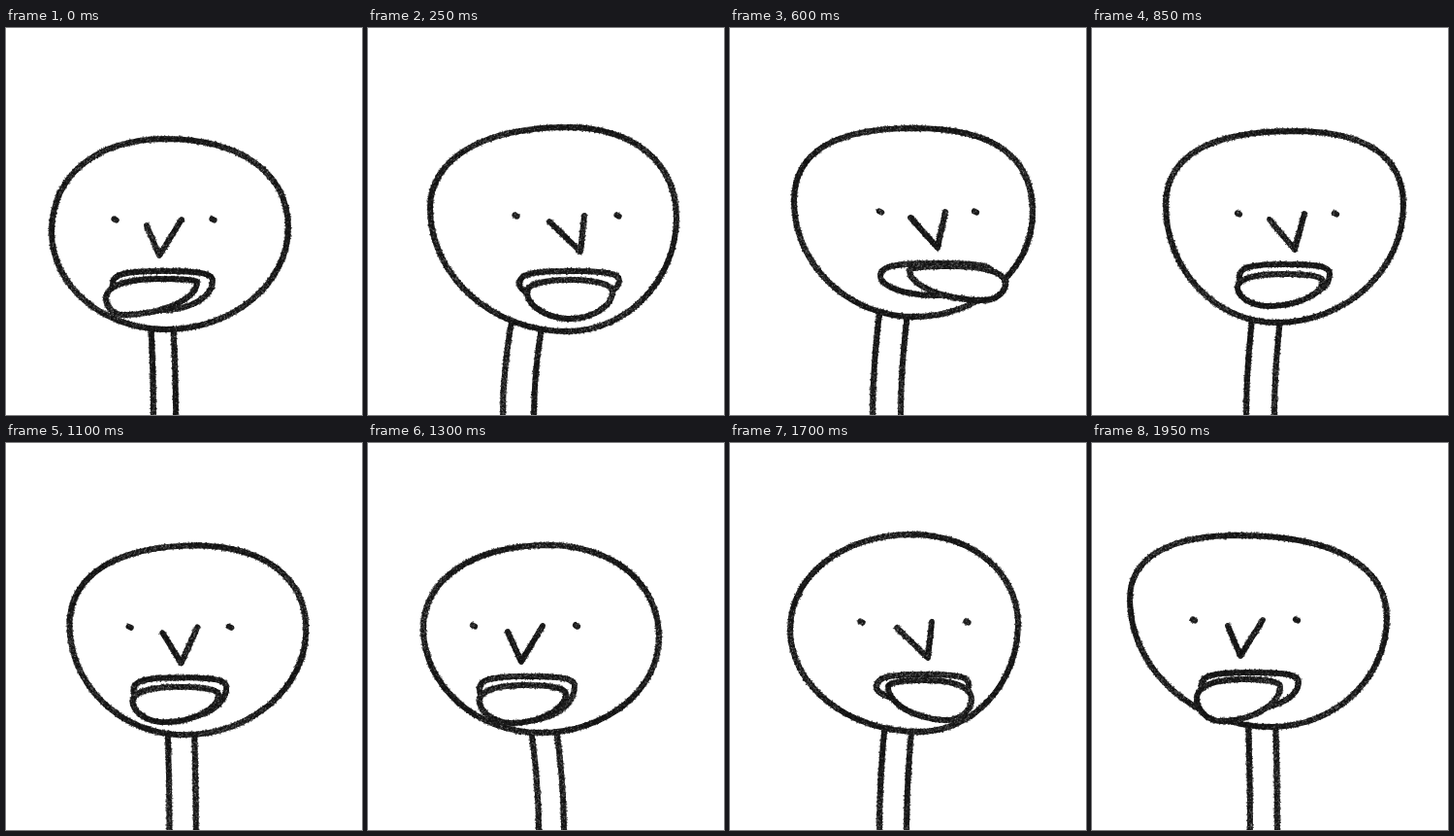
Recreate the animation shown at these times as an HTML page with a canvas. Size 367 by 398 pixels, loop 2 s.

```html
<!DOCTYPE html>
<html lang="en">
<head>
<meta charset="utf-8">
<title>Talking head</title>
<style>
  html, body { margin: 0; width: 100%; height: 100%; overflow: hidden; background: #fff; }
  canvas { display: block; }
</style>
</head>
<body>
<canvas id="stage" width="367" height="398"></canvas>
<script>
const W = 367, H = 398, LOOP = 2000, STEP = 50;
const ctx = document.getElementById('stage').getContext('2d');

// head: box (left, top, right, bottom), then topX, rightY, bottomX, leftY, brow roundness
// face: centre between the eyes, how far the nose turns, eye distance
// lips: box; tongue: box and sideways swing; neck: x at chin, x at floor, width
const poses = [
  { at: 0, head: [47, 114, 291, 310, 165, 205, 165, 210, 0.61], face: [163, 197, -5, 101],
    lips: [110, 250, 213, 290], tongue: [103, 258, 197, 295, -0.32], neck: [149, 152, 23] },
  { at: 250, head: [64, 102, 318, 312, 205, 195, 205, 185, 0.61], face: [205, 193, 14, 105],
    lips: [156, 250, 259, 280], tongue: [164, 259, 252, 299, 0], neck: [148, 139, 32] },
  { at: 600, head: [66, 103, 312, 297, 190, 190, 190, 178, 0.67], face: [204, 189, 10, 98],
    lips: [155, 242, 270, 275], tongue: [185, 245, 284, 280, 0.28], neck: [155, 147, 29] },
  { at: 850, head: [76, 106, 321, 303, 208, 182, 190, 182, 0.66], face: [201, 191, 8, 100],
    lips: [152, 243, 245, 280], tongue: [150, 253, 238, 286, -0.14], neck: [166, 159, 29] },
  { at: 1300, head: [57, 105, 300, 298, 185, 200, 178, 190, 0.59], face: [162, 188, -4, 106],
    lips: [115, 240, 213, 285], tongue: [115, 249, 204, 288, -0.13], neck: [167, 176, 26] },
  { at: 1700, head: [62, 94, 297, 297, 188, 186, 195, 192, 0.57], face: [190, 184, 14, 109],
    lips: [151, 238, 246, 266], tongue: [163, 244, 249, 285, 0.22], neck: [160, 154, 28] },
  { at: 1950, head: [39, 95, 304, 292, 150, 180, 185, 160, 0.64], face: [158, 182, -5, 106],
    lips: [113, 236, 213, 273], tongue: [108, 243, 194, 286, -0.21], neck: [161, 163, 28] }
];

function poseAt(time) {
  const i = poses.findLastIndex(p => p.at <= time);
  const a = poses[i], b = poses[(i + 1) % poses.length];
  const k = (time - a.at) / ((b.at || LOOP) - a.at);
  const mix = {};
  for (const part of ['head', 'face', 'lips', 'tongue', 'neck']) {
    mix[part] = a[part].map((v, n) => v + (b[part][n] - v) * k);
  }
  return mix;
}

function randomFrom(seed) {
  let s = seed;
  return () => {
    s = (s + 0x6D2B79F5) | 0;
    let t = Math.imul(s ^ (s >>> 15), 1 | s);
    t = (t + Math.imul(t ^ (t >>> 7), 61 | t)) ^ t;
    return ((t ^ (t >>> 14)) >>> 0) / 4294967296;
  };
}

// Closed outline touching its box at four points, one Bezier per corner.
function blob([l, t, r, b], topX, rightY, bottomX, leftY, above, below) {
  const ends = [[topX, t], [r, rightY], [bottomX, b], [l, leftY], [topX, t]];
  const corners = [[r, t], [r, b], [l, b], [l, t]];
  const round = [above, below, below, above];
  const out = [ends[0]];
  corners.forEach((c, i) => {
    const p = ends[i], q = ends[i + 1], k = round[i];
    for (let j = 1; j <= 16; j++) {
      const u = j / 16, v = 1 - u;
      out.push([0, 1].map(m =>
        p[m] * v * v * v + 3 * (p[m] + (c[m] - p[m]) * k) * v * v * u +
        3 * (q[m] + (c[m] - q[m]) * k) * v * u * u + q[m] * u * u * u));
    }
  });
  return out;
}

function headShape([l, t, r, b, topX, rightY, bottomX, leftY, brow]) {
  return blob([l, t, r, b], topX, rightY, bottomX, leftY, brow, 0.55);
}

function lipShape([l, t, r, b]) {
  const mid = (l + r) / 2;
  return blob([l, t, r, b], mid, t + 10, mid, t + 13, 0.76, 0.55);
}

// The swinging tip drops on one side and lifts on the other.
function tongueShape([l, t, r, b, swing]) {
  const mid = (l + r) / 2, w = r - l, h = b - t;
  return blob([l, t, r, b], mid - swing * w * 0.3, t + h * (0.32 + swing * 0.7),
    mid + swing * w, t + h * (0.32 - swing * 0.7), 0.64, 0.52);
}

function neckLine(top, x0, x1) {
  return Array.from({ length: 9 }, (_, i) => {
    const u = i / 8;
    return [x0 + (x1 - x0) * u * (2 - u), top + (H + 4 - top) * u];
  });
}

function crayon(points, rand, fill) {
  const phase = rand() * 6;
  ctx.beginPath();
  points.forEach(([x, y]) => ctx.lineTo(x, y));
  if (fill) {
    ctx.fillStyle = '#fff';
    ctx.fill();
  }
  ctx.lineWidth = 5.8;
  ctx.lineCap = ctx.lineJoin = 'round';
  ctx.strokeStyle = '#222';
  ctx.stroke();

  const dot = (x, y, reach, size) => {
    const angle = rand() * Math.PI * 2, r = Math.sqrt(rand()) * reach;
    ctx.fillRect(x + Math.cos(angle) * r - size / 2, y + Math.sin(angle) * r - size / 2, size, size);
  };
  let travelled = 0;
  for (let i = 1; i < points.length; i++) {
    const [x0, y0] = points[i - 1], [x1, y1] = points[i];
    const len = Math.hypot(x1 - x0, y1 - y0), count = Math.max(1, Math.round(len));
    for (let j = 0; j < count; j++) {
      const x = x0 + (x1 - x0) * j / count, y = y0 + (y1 - y0) * j / count;
      ctx.fillStyle = 'rgba(15,15,15,.65)';
      for (let d = 0; d < 4; d++) dot(x, y, 3.7, 1.2);
      const wear = 0.55 + 0.4 * Math.sin((travelled + j) / 28 + phase);
      ctx.fillStyle = 'rgba(150,150,150,.5)';
      for (let d = 0; d < 2; d++) if (rand() < wear) dot(x, y, 3.3, 1.1);
    }
    travelled += len;
  }
}

function draw(step) {
  const rand = randomFrom(step * 977 + 13);
  const { head, face, lips, tongue, neck } = poseAt(step * STEP);
  const [x, y, turn, gap] = face;
  const [chinX, floorX, width] = neck;
  const chinY = head[3] - 10;

  ctx.fillStyle = '#fff';
  ctx.fillRect(0, 0, W, H);
  for (const dx of [0, width]) crayon(neckLine(chinY, chinX + dx, floorX + dx), rand);
  crayon(headShape(head), rand, true);
  crayon([[x - 18, y + 6], [x + turn, y + 37], [x + 18, y]], rand);
  for (const side of [-0.5, 0.5]) {
    const ex = x + gap * side;
    crayon([[ex - 1.2, y - 0.6], [ex + 1.2, y + 0.6]], rand);
  }
  crayon(lipShape(lips), rand, true);
  crayon(tongueShape(tongue), rand, true);
}

const start = performance.now();
let shown = 0;
draw(0);
function tick() {
  const step = Math.floor(((performance.now() - start) % LOOP) / STEP);
  if (step !== shown) draw(shown = step);
  requestAnimationFrame(tick);
}
requestAnimationFrame(tick);
</script>
</body>
</html>
```
